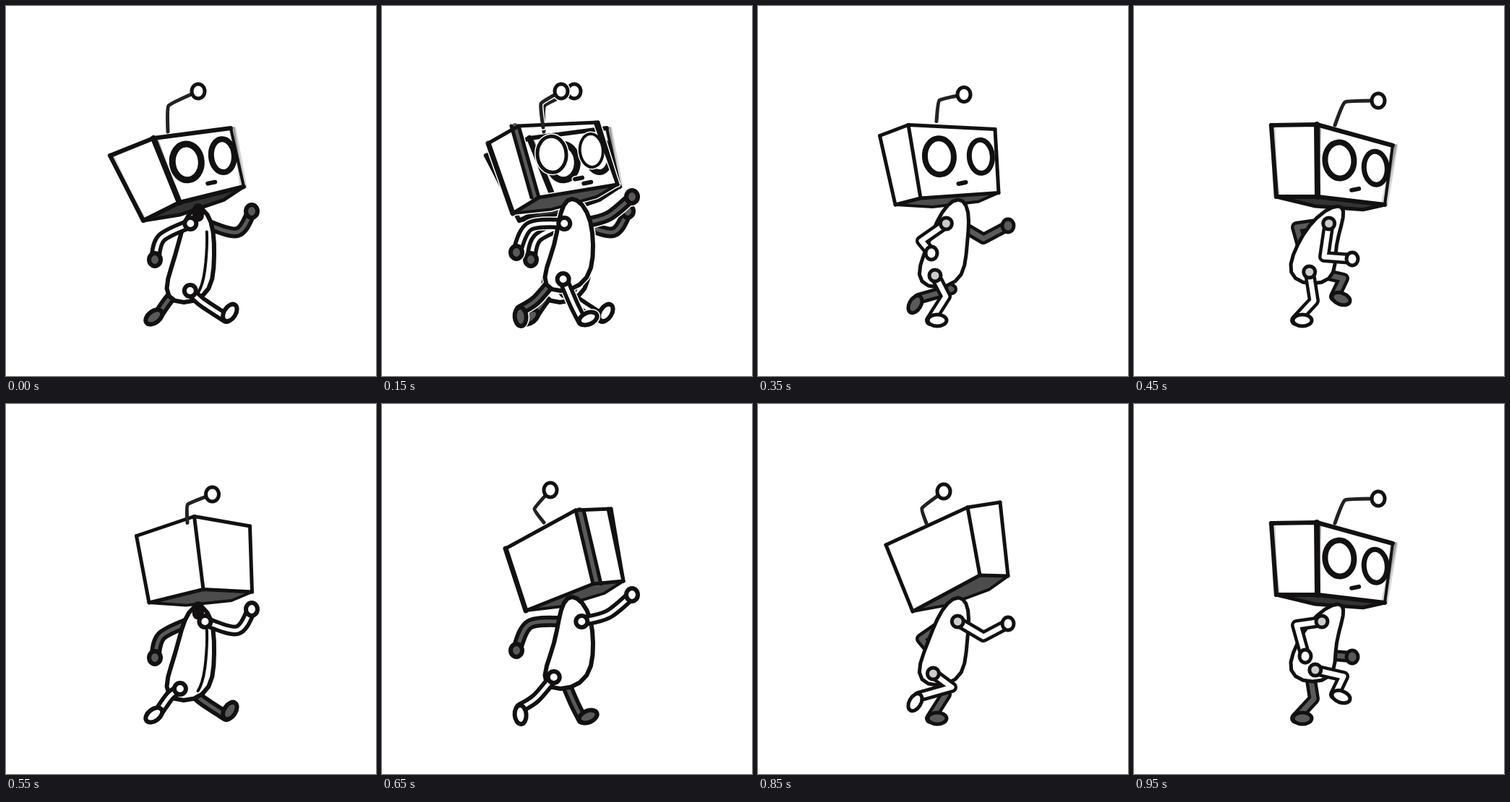
An HTML page with a canvas for the animation above (1.05 s loop, 512 by 512 pixels).

```html
<!DOCTYPE html>
<html lang="en">
<head>
<meta charset="utf-8">
<title>Robot walk</title>
<style>
html, body { margin: 0; width: 100%; height: 100%; overflow: hidden; background: #fff; }
canvas { display: block; width: 100vw; height: 100vh; }
</style>
</head>
<body>
<canvas id="stage" width="512" height="512"></canvas>
<script>
const ctx = document.getElementById('stage').getContext('2d');
ctx.lineJoin = ctx.lineCap = 'round';
const INK = '#121011', GREY = '#5a5a5a', WHITE = '#fff';
let halo = 0; // when set, everything is painted white and this much wider
let seed = 1;

const rnd = () => (seed = seed * 16807 % 2147483647) / 2147483647;
const lerp = (a, b, t) => a.map((v, i) => v + (b[i] - v) * t);
const shift = ([x, y], dx, dy = 0) => [x + dx, y + dy];

// Path through points; k = 0 gives straight segments.
function curve(pts, k = 0, closed = false) {
  const n = pts.length, path = new Path2D();
  const at = i => pts[closed ? (i + n) % n : Math.max(0, Math.min(n - 1, i))];
  path.moveTo(...at(0));
  for (let i = 0; i < (closed ? n : n - 1); i++) {
    const [a, b, c, d] = [at(i - 1), at(i), at(i + 1), at(i + 2)];
    path.bezierCurveTo(b[0] + (c[0] - a[0]) * k / 6, b[1] + (c[1] - a[1]) * k / 6,
      c[0] - (d[0] - b[0]) * k / 6, c[1] - (d[1] - b[1]) * k / 6, ...c);
  }
  if (closed) path.closePath();
  return path;
}

function oval([x, y], rx, ry, tilt = 0) {
  const path = new Path2D();
  path.ellipse(x, y, rx, ry, tilt, 0, 7);
  return path;
}

function stroke(path, w, color = INK) {
  ctx.strokeStyle = halo ? WHITE : color;
  ctx.lineWidth = w + halo;
  ctx.stroke(path);
}

function fill(path, color) {
  ctx.fillStyle = halo ? WHITE : color;
  ctx.fill(path);
}

function shape(path, color, w) {
  fill(path, color);
  stroke(path, w);
}

// Two visible faces of a box share the edge topMid-lowMid.
function box(topLeft, topMid, topRight, lowRight, lowMid, lowLeft, antenna, style = {}) {
  return { corners: [topLeft, topMid, topRight, lowRight, lowMid, lowLeft], antenna, ...style };
}

// Pose halfway between two heads, with the first one's face.
function between(a, b) {
  const mid = key => a[key].map((p, i) => lerp(p, b[key][i], .5));
  return { corners: mid('corners'), antenna: mid('antenna'), face: a.face };
}

const heads = {
  front: box([144, 207], [204, 183], [311, 169], [329, 250], [240, 272], [190, 297],
    [[224, 174], [225, 138], [266, 118]], { face: 9, rough: true }),
  left: box([147, 190], [189, 166], [299, 161], [326, 247], [217, 265], [181, 287],
    [[223, 168], [220, 135], [248, 118]], { face: 5, band: -10, clear: true }),
  farLeft: box([147, 194], [163, 165], [298, 148], [319, 242], [196, 268], [183, 286],
    [[216, 154], [210, 128], [232, 114]], { face: 8 }),
  level: box([190, 165], [253, 164], [358, 193], [347, 275], [254, 264], [197, 264],
    [[278, 165], [292, 133], [338, 131]], { face: 8, rough: true }),
  right: box([171, 200], [268, 147], [317, 145], [334, 245], [292, 249], [199, 286],
    [[224, 164], [211, 145], [233, 119]], { band: 11 }),
  farRight: box([177, 195], [290, 143], [335, 136], [346, 238], [307, 237], [214, 287],
    [[233, 165], [227, 144], [257, 121]])
};

// Arms: elbow, hand. Legs: knee, ankle, toe angle. "back" swings left, "fore" right.
const poses = {
  contact: {
    top: [266, 280], low: [246, 410], bulge: 5, w: 6, soft: 1, fold: true,
    arms: { back: [[215, 321], [206, 351]], fore: [[320, 313], [340, 284]] },
    legs: { back: [[227, 404], [212, 425], 2.5], fore: [[270, 409], [305, 432], -1] }
  },
  reach: {
    top: [263, 267], low: [247, 394], bulge: 10, w: 6, soft: 1,
    arms: { back: [[204, 305], [186, 341]], fore: [[313, 291], [346, 264]] },
    legs: { back: [[213, 407], [191, 421], 1.5], fore: [[265, 412], [277, 436], -.4] }
  },
  stretch: {
    top: [264, 266], low: [241, 390], bulge: 21, w: 5, soft: 0,
    arms: { back: [[213, 313], [220, 329]], fore: [[335, 273], [337, 243]] },
    legs: { back: [[214, 402], [179, 419], 1.5], fore: [[255, 400], [256, 435], -.2] }
  },
  lift: {
    top: [277, 268], low: [248, 389], bulge: 0, w: 5, soft: 0,
    arms: { back: [[226, 325], [240, 342]], fore: [[312, 322], [346, 304]] },
    legs: { back: [[268, 392], [222, 405], 2.1], fore: [[260, 402], [239, 435], 0] }
  },
  pass: {
    top: [282, 277], low: [247, 384], bulge: -11, w: 5, soft: 0,
    arms: { back: [[225, 306], [237, 349]], fore: [[263, 347], [302, 350]] },
    legs: { back: [[249, 408], [224, 435], 0], fore: [[290, 377], [278, 402], .35] }
  }
};

function drawHead({ corners, antenna, face, rough, band, clear }) {
  const [a, b, c, d, e, f] = corners;
  const w = rough ? 6 : 5;
  const edge = (p, q, width = w, color) => stroke(curve([p, q]), width, color);
  const chin = [.36, .8].map(t => shift(lerp(f, d, t), 0, 9));

  fill(curve([a, b, e, f]), WHITE);
  if (!clear) fill(curve([b, c, d, e]), WHITE);
  fill(curve([f, e, d, chin[1], chin[0]]), rough ? '#333' : '#4c4c4c');

  if (rough) {
    for (const [p, q] of [[a, f], [b, e], [c, d], [a, b]]) {
      for (let i = 0; i < 4; i++) edge(shift(p, rnd() * 8 - 2), shift(q, rnd() * 8 - 4), 4, 'rgba(0,0,0,.16)');
    }
  }
  if (band) {
    edge(shift(b, band / 2), shift(e, band / 2), 8, GREY);
    edge(shift(b, band), shift(e, band));
    edge(shift(c, -4), d);
  }
  stroke(curve([a, b, c]), w);
  edge(c, d, rough ? 4 : w);
  edge(a, f, band ? 7 : w);
  edge(b, e, rough ? 8 : w);
  stroke(curve([f, e, d]), w);
  stroke(curve([f, ...chin, d]), w - 1);

  stroke(curve(antenna, .4), 5, '#222');
  shape(oval(antenna[2], 9, 10), WHITE, 5);
  if (face) {
    const on = (u, v) => lerp(lerp(b, c, u), lerp(e, d, u), v);
    shape(oval(on(.31, .43), 20, 25, -.08), WHITE, face);
    shape(oval(on(.81, .43), 16, 23, -.08), WHITE, face - 1);
    const mouth = on(.55, .82);
    edge(shift(mouth, -5, 1), shift(mouth, 5, -1), 6);
  }
}

// Egg-shaped torso; k scales the half width, its sign picks the side.
function flank({ top, low, bulge }, k, from = 0, to = 1) {
  return Array.from({ length: 13 }, (_, i) => {
    const t = from + (to - from) * (1 - Math.cos(Math.PI * i / 12)) / 2;
    const half = (18 + 18 * t) * Math.sqrt(Math.max(0, 1 - (2 * t - 1) ** 4));
    return shift(lerp(top, low, t), bulge * 4 * t * (1 - t) + k * half);
  });
}

function drawTorso(pose) {
  const outline = [...flank(pose, 1), ...flank(pose, -1).reverse()];
  shape(curve(outline, 0, true), WHITE, pose.w);
  if (pose.fold) {
    stroke(curve(flank(pose, .6, .25, .9)), 4);
    stroke(curve(flank(pose, 0, .01, .08)), 16);
  }
}

function drawLimb(pose, kind, side, near) {
  const [bend, end, toe] = pose[kind][side];
  const { w, soft, low } = pose;
  const arm = kind === 'arms';
  // Joints drift a little towards the swinging end.
  const joint = arm ? [264 + (end[0] - 264) * .15, 301] : [246 + (end[0] - 246) * .15, low[1] - 16];
  const path = curve([joint, bend, end], soft);
  const tone = near ? WHITE : GREY;
  stroke(path, 16);
  stroke(path, 17 - 2 * w, tone);
  if (arm) shape(oval(end, 8, 9), soft && side === 'back' ? GREY : tone, w);
  else shape(oval(shift(end, 9 * Math.cos(toe), 9 * Math.sin(toe)), 13, 8, toe), tone, w);
  if (near) shape(oval(joint, 8, 8), soft ? WHITE : '#ccc', w);
}

// armSide: swing of the near arm; the near leg swings the other way.
function robot(head, poseName, armSide) {
  const pose = poses[poseName];
  const legSide = armSide === 'back' ? 'fore' : 'back';
  drawHead(head);
  drawLimb(pose, 'legs', armSide, false);
  drawLimb(pose, 'arms', legSide, false);
  drawTorso(pose);
  drawLimb(pose, 'legs', legSide, true);
  drawLimb(pose, 'arms', armSide, true);
}

const { front, left, farLeft, level, right, farRight } = heads;
const start = () => robot(front, 'contact', 'back');

const steps = [
  start,
  () => {
    start();
    for (halo of [3, 0]) robot(left, 'reach', 'back');
  },
  () => robot(farLeft, 'stretch', 'back'),
  () => robot(between(farLeft, level), 'lift', 'back'),
  () => robot(level, 'pass', 'fore'),
  () => robot(between(right, level), 'contact', 'fore'),
  () => robot(right, 'reach', 'fore'),
  () => robot(between(right, farRight), 'stretch', 'fore'),
  () => robot(farRight, 'lift', 'fore'),
  () => robot(level, 'pass', 'back')
];

function frame() {
  const t = performance.now() % 1050;
  seed = 7;
  ctx.fillStyle = WHITE;
  ctx.fillRect(0, 0, 512, 512);
  steps[t < 150 ? 0 : Math.floor((t - 50) / 100)]();
  requestAnimationFrame(frame);
}
frame();
</script>
</body>
</html>
```
